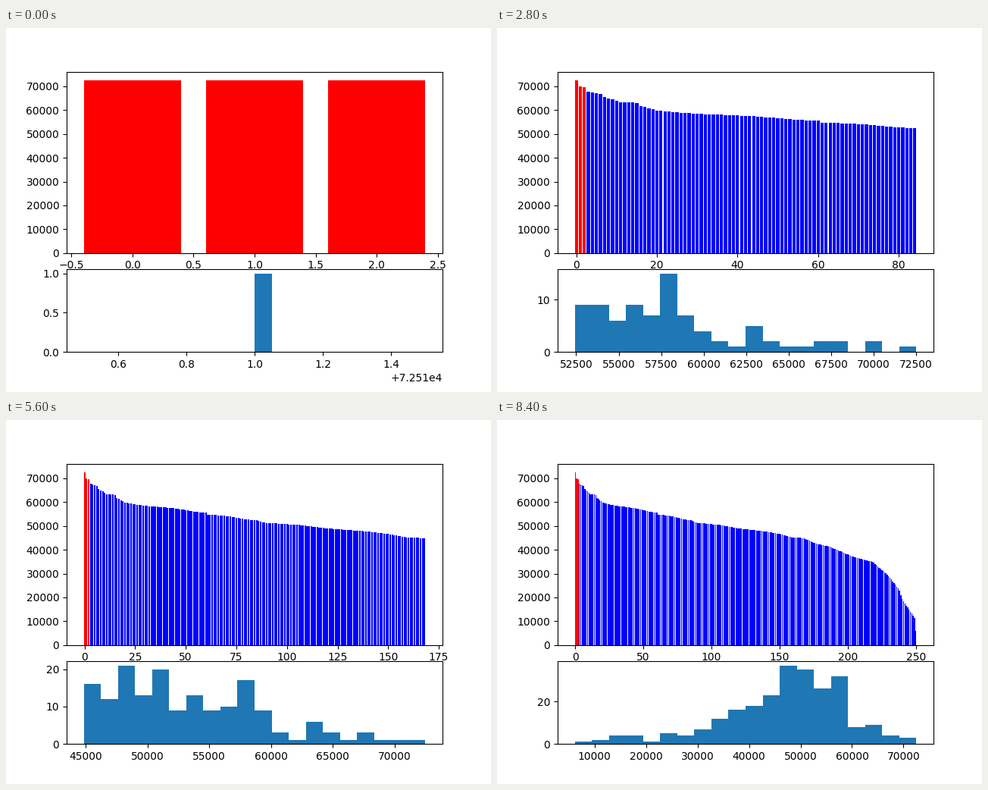
Animation, 640 px wide and 480 px high, one loop 8500 ms. Source, as a matplotlib script:

```python
import numpy as np
import matplotlib.pyplot as plt
from matplotlib.animation import FuncAnimation

FRAMES = 85
STEP = 3      # values added per frame

# Key points (rank, value) of the falling curve, straight in between
KEYS = [
    (0, 72511), (1, 70050), (2, 69700), (3, 67850), (6, 66800), (7, 65580),
    (11, 63355), (15, 63050), (16, 61760), (20, 59750), (30, 58420),
    (36, 58062), (44, 57450), (55, 55950), (60, 55550), (61, 54820),
    (72, 54000), (79, 52830), (85, 52330), (88, 51440), (106, 50390),
    (120, 48970), (140, 47690), (149, 46740), (158, 45320), (168, 44840),
    (177, 42500), (187, 41220), (203, 37300), (213, 35603), (218, 35000),
    (230, 29050), (238, 22950), (240, 19200), (249, 11500), (250, 6125),
]
rank, level = zip(*KEYS)
values = np.interp(np.arange(rank[-1] + 1), rank, level)

fig = plt.figure(figsize=(6.4, 4.8), dpi=100)
bar_ax = fig.add_subplot(3, 1, (1, 2))
hist_ax = fig.add_subplot(3, 1, 3)


def draw(i):
    shown = values[:STEP * i + 1]
    # a single value is spread over three bars
    bars = shown if len(shown) > 1 else np.repeat(shown, 3)
    colors = ["red"] * 3 + ["blue"] * (len(bars) - 3)

    bar_ax.clear()
    bar_ax.bar(np.arange(len(bars)), bars, color=colors)
    hist_ax.clear()
    hist_ax.hist(shown, bins=20)
    return []


anim = FuncAnimation(fig, draw, frames=FRAMES, init_func=lambda: draw(0),
                     interval=100, repeat=True, repeat_delay=0)
plt.show()
```
